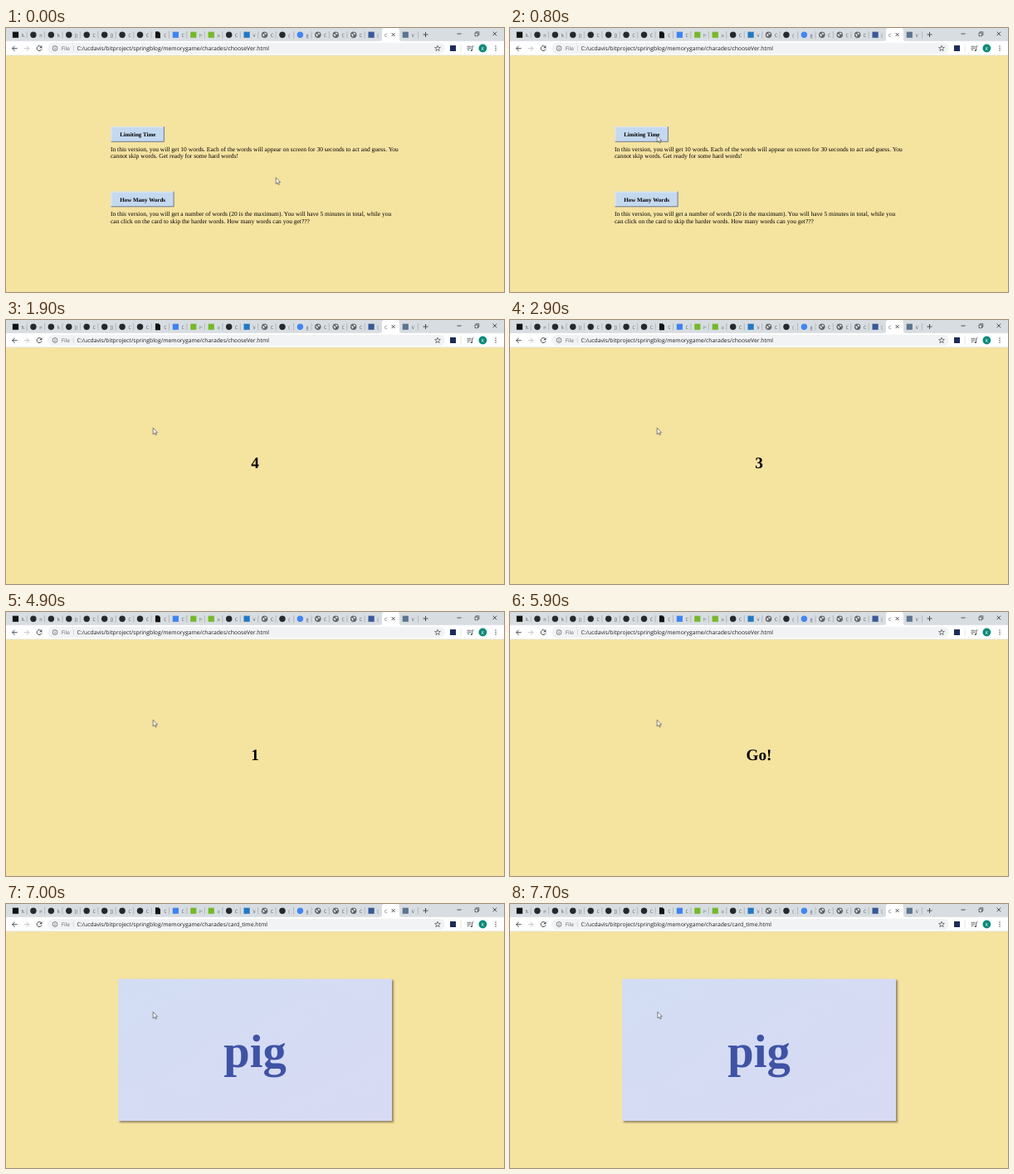
An HTML page that plays this animation: 600x319 px, repeating every 8000 ms.

```html
<!DOCTYPE html>
<html lang="en">
<head>
<meta charset="utf-8">
<title>Charades</title>
<style>
  html, body { margin: 0; width: 100%; height: 100%; overflow: hidden; background: #f5e3a0; }
  svg { display: block; }
  text { text-rendering: geometricPrecision; white-space: pre; }
  .ui { font-family: "Open Sans", "Noto Sans", sans-serif; }
  .page { font-family: "Liberation Serif", "Times New Roman", serif; }
  .bold { font-weight: bold; }
  .line { fill: none; stroke: #4a4d51; stroke-width: 1; }
</style>
</head>
<body>
<svg id="stage" width="600" height="319" viewBox="0 0 600 319">
  <defs>
    <linearGradient id="paper" x1="0" y1="0" x2="1" y2="1">
      <stop offset="0" stop-color="#d2ddf4"/>
      <stop offset="1" stop-color="#d8daf3"/>
    </linearGradient>
    <filter id="blur" x="-5%" y="-5%" width="110%" height="110%">
      <feGaussianBlur stdDeviation="1.2"/>
    </filter>
  </defs>

  <rect width="600" height="319" fill="#f5e3a0"/>

  <!-- Toolbar and tab strip -->
  <rect width="600" height="33" fill="#fff"/>
  <rect width="600" height="15.8" fill="#d8dde1"/>
  <path d="M450 16Q453 16 453 13V3Q453 0 456 0H471Q474 0 474 3V13Q474 16 477 16Z" fill="#fff"/>
  <g id="tabs" class="ui" font-size="5.9" fill="#5b5f64"></g>
  <path class="line" d="M464.6 6l4 4m0-4l-4 4"/>
  <path class="line" d="M502.5 8h6m-3-3v6"/>
  <path class="line" d="M543.5 7h5M586.6 4.6l4.6 4.6m0-4.6l-4.6 4.6" stroke-width=".9"/>
  <path class="line" d="M565 6h3.6v3.6h-3.6zM566.2 6V4.7h3.7v3.7h-1.3" style="stroke-width:.8"/>

  <rect y="32.7" width="600" height=".6" fill="#d9d9d5"/>
  <rect x="50" y="17.8" width="479" height="13.4" rx="6.7" fill="#f1f3f4"/>
  <path class="line" d="M13.6 24.7H7.6m3-3l-3 3 3 3"/>
  <path class="line" d="M21.8 24.7h6m-3-3l3 3-3 3" style="stroke:#c0c3c6"/>
  <g id="reload">
    <path class="line" d="M42.5 22.7A3 3 0 1 0 43 25.5"/>
    <path d="M43.4 21v3.2h-3.2z" fill="#4a4d51"/>
  </g>
  <path id="stop" class="line" d="M37.4 22l5.2 5.2m0-5.2l-5.2 5.2"/>
  <circle class="line" cx="59" cy="24.5" r="2.9" style="stroke-width:.7"/>
  <path class="line" d="M59 24.1v2m0-3.3v.7" style="stroke-width:.7"/>
  <g class="ui" font-size="6.8">
    <text x="66.7" y="26.9" font-size="6.5" fill="#63676b">File</text>
    <text id="url" x="85.5" y="26.7" fill="#1c1e20"></text>
  </g>
  <path d="M81.3 21v7" stroke="#c4c7ca" stroke-width=".6"/>
  <path id="star" class="line" style="stroke-width:.7"/>
  <rect x="535" y="21" width="7" height="7" fill="#1d2c5c"/>
  <path d="M548.2 20v9" stroke="#d3d6d9" stroke-width=".6"/>
  <path class="line" d="M555.5 22.3h5m-5 2h5m-5 2h3M561.8 27v-5h1.8" style="stroke-width:.8"/>
  <circle cx="560.9" cy="27" r="1.1" fill="#4a4d51"/>
  <circle cx="574.4" cy="24.5" r="4.9" fill="#0b8a7a"/>
  <text class="ui" x="574.4" y="26.6" font-size="5.8" fill="#fff" text-anchor="middle">K</text>
  <g fill="#4a4d51"><circle cx="590" cy="22" r=".75"/><circle cx="590" cy="24.5" r=".75"/><circle cx="590" cy="27" r=".75"/></g>

  <g id="menu" class="page" font-size="7.5">
    <g id="buttons"></g>
    <text x="126" y="148.9">In this version, you will get 10 words. Each of the words will appear on screen for 30 seconds to act and guess. You</text>
    <text x="126" y="157.4">cannot skip words. Get ready for some hard words!</text>
    <text x="126" y="227.4">In this version, you will get a number of words (20 is the maximum). You will have 5 minutes in total, while you</text>
    <text x="126" y="235.9">can click on the card to skip the harder words. How many words can you get???</text>
  </g>

  <text id="count" class="page bold" x="300" y="178.7" font-size="19.2" text-anchor="middle"></text>

  <g id="card">
    <rect x="137" y="92" width="330" height="172" fill="#5d5742" opacity=".65" filter="url(#blur)"/>
    <rect x="135" y="90.5" width="330" height="171.5" fill="url(#paper)"/>
    <text class="page bold" x="300" y="197" font-size="56.5" fill="#3f53a5" text-anchor="middle">pig</text>
  </g>

  <path id="cursor" d="M0 0V7.7L1.8 6.1 3 8.7 4.2 8.2 3.1 5.6H5.4Z" fill="#fff" stroke="#333" stroke-width=".6" stroke-linejoin="round"/>
</svg>

<script>
const $ = id => document.getElementById(id);
const LOOP = 8000;
const FOLDER = "C:/ucdavis/bitproject/springblog/memorygame/charades/";

// Tab icons: [shape, colour]
const ICONS = {
  k: ["square", "#111"], g: ["circle", "#24292e"], d: ["doc", "#111"],
  b: ["square", "#3f83ee"], n: ["square", "#76b82a"], v: ["square", "#2378c4"],
  w: ["globe", "#5f6368"], o: ["circle", "#4285f4"], f: ["square", "#3b5998"],
  p: ["square", "#5c7590"]
};

function icon(kind, x) {
  const [shape, color] = ICONS[kind];
  const disc = `<circle cx="${x}" cy="8.2" r="3.7" fill="${color}"/>`;
  if (shape === "circle") return disc;
  if (shape === "globe") return disc +
    `<path d="M${x - 2.8} 7l2 .5 1 1.5-1.5 1.8zM${x} 5.4l2.3.8-.5 2-1.8-1z" fill="#e4e7ea"/>`;
  if (shape === "doc") return `<path d="M${x - 3} 4.3h4l2 2v6h-6z" fill="${color}"/>`;
  return `<rect x="${x - 3.6}" y="4.6" width="7.2" height="7.2" fill="${color}"/>`;
}

// Titles are cut off by the narrow tabs
const label = (s, x, w = 3.2) =>
  `<svg x="${x}" y="0" width="${w}" height="16"><text x="0" y="10.6">${s}</text></svg>`;

function drawTabs() {
  const kinds = "kgggggggdbnngvwgowwwf";
  const names = "M m M [( C [( C C C C H o C V C ( g C C C (".split(" ");
  let out = "";
  [...kinds].forEach((kind, i) => {
    const x = 11.5 + i * 21.43;
    out += icon(kind, x) + label(names[i], x + 7.2);
    if (i < kinds.length - 1)
      out += `<path d="M${x + 13.6} 4v8.5" stroke="#9ba0a5" stroke-width=".6"/>`;
  });
  out += label("C", 456, 4) + icon("p", 481.3) + label("V", 488.6) +
    `<path d="M496.5 4v8.5" stroke="#9ba0a5" stroke-width=".6"/>`;
  $("tabs").innerHTML = out;
}

function button(y, w, text) {
  const r = 126.5 + w, b = y + 18.5;
  return `<rect x="126.5" y="${y}" width="${w}" height="18.5" fill="#c4d9f0"/>
    <path d="M127 ${b}V${y + .5}H${r}" fill="none" stroke="#e4e9ec"/>
    <path d="M126.5 ${b - .4}H${r - .4}V${y}" fill="none" stroke="#77797b"/>
    <text class="bold" x="137.2" y="${y + 11.9}" font-size="7.03">${text}</text>`;
}

function starPath(cx, cy) {
  const pts = Array.from({ length: 10 }, (_, i) => {
    const r = i % 2 ? 1.5 : 3.6, a = i * Math.PI / 5 - Math.PI / 2;
    return `${cx + r * Math.cos(a)} ${cy + r * Math.sin(a)}`;
  });
  return `M${pts.join("L")}Z`;
}

drawTabs();
$("buttons").innerHTML = button(119.2, 64.3, "Limiting Time") + button(197.7, 76, "How Many Words");
$("star").setAttribute("d", starPath(520, 24.7));

const COUNT = [[900, "5"], [1900, "4"], [2900, "3"], [3900, "2"], [4900, "1"], [5900, "Go!"], [6900, ""]];
const show = (id, on) => $(id).setAttribute("visibility", on ? "visible" : "hidden");

// The pointer moves in steps of 100 ms, then nudges once near the end
function cursorAt(t) {
  if (t >= 7700) return [177.9, 130.3];
  const step = Math.floor(t / 100) * 100;
  const p = Math.min(1, Math.max(0, (step - 100) / 700));
  const e = p * p * (3 - 2 * p);
  return [325.2 - 148 * e, 180.7 - 50.3 * e];
}

function render(t) {
  const loading = t >= 6900 && t < 7000;
  const playing = t >= 7000;
  show("menu", t < 900);
  show("card", playing);
  show("reload", !loading);
  show("stop", loading);
  $("url").textContent = FOLDER + (playing ? "card_time.html" : "chooseVer.html");
  $("count").textContent = COUNT.reduce((s, [at, text]) => t >= at ? text : s, "");
  $("cursor").setAttribute("transform", `translate(${cursorAt(t)})`);
}

const start = performance.now();
function tick() {
  render((performance.now() - start) % LOOP);
  requestAnimationFrame(tick);
}
tick();
</script>
</body>
</html>
```
